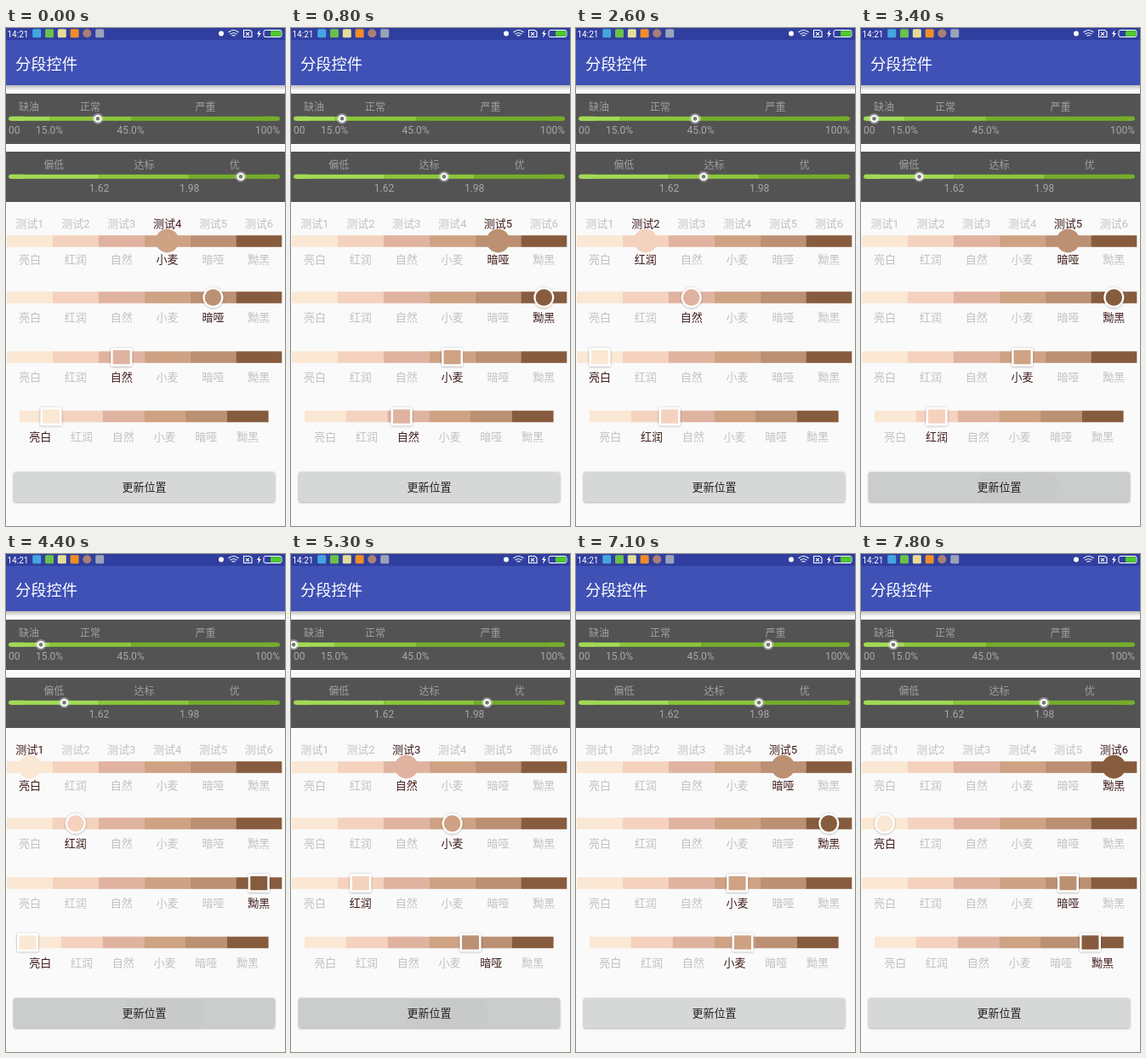
An HTML page that plays this animation: 328x584 px, repeating every 8 s.

```html
<!DOCTYPE html>
<html lang="zh-CN">
<head>
<meta charset="utf-8">
<title>分段控件</title>
<style>
html, body { margin: 0; width: 100%; height: 100%; overflow: hidden; background: #fafafa; }
svg { display: block; width: 328px; height: 584px; }
text { font-family: Roboto, "Noto Sans CJK SC", "Noto Sans CJK", sans-serif; }
</style>
</head>
<body>
<svg id="stage" viewBox="0 0 328 584">
  <defs>
    <linearGradient id="fade" x2="0" y2="1">
      <stop stop-color="#000" stop-opacity=".26"/>
      <stop offset="1" stop-color="#000" stop-opacity="0"/>
    </linearGradient>
    <filter id="soft" x="-30%" y="-30%" width="160%" height="160%">
      <feDropShadow dx="0" dy=".4" stdDeviation="1.2" flood-opacity=".42"/>
    </filter>
    <clipPath id="face"><rect x="9" y="521" width="307" height="35" rx="2"/></clipPath>
  </defs>
</svg>
<script>
const stage = document.getElementById('stage');
const LOOP = 8000, PRESS = 300;
const SKIN = ['#fae8d4', '#f4d2be', '#e0b3a0', '#cea283', '#bc9072', '#875c3e'];
const GREEN = ['#a2da55', '#8bc73a', '#75ad2b'];
const TONES = ['亮白', '红润', '自然', '小麦', '暗哑', '黝黑'];
const TESTS = TONES.map((_, i) => '测试' + (i + 1));

// Every press: time, upper slider x, lower slider x, free thumb x
const PRESSES = [
  [0, 108, 276, 53],
  [500, 60, 180, 130],
  [1100, 190, 120, 250],
  [1700, 79.5, 3, 211],
  [2300, 140, 150, 110],
  [2700, 255, 98, 170],
  [3000, 94, 245, 235],
  [3400, 15.5, 68.5, 89],
  [3900, 120, 160, 150],
  [4400, 41, 68.5, 25.5],
  [4900, 165, 130, 120],
  [5300, 3, 230.5, 211],
  [5700, 78, 170, 145],
  [6400, 226, 215, 196],
  [7500, 38, 215, 269.5]
];

function add(tag, attrs, parent = stage) {
  const node = document.createElementNS('http://www.w3.org/2000/svg', tag);
  for (const key in attrs) node.setAttribute(key, attrs[key]);
  return parent.appendChild(node);
}
const rect = (x, y, width, height, fill, more) =>
  add('rect', { x, y, width, height, fill, ...more });

function label(str, x, middle, size, fill, anchor = 'middle') {
  const node = add('text', { x, y: middle + size * .37, 'font-size': size, fill, 'text-anchor': anchor });
  node.textContent = str;
  return node;
}

function drawHeader() {
  rect(0, 67, 328, 6, 'url(#fade)');
  rect(0, 14, 328, 53, '#3f51b5');
  rect(0, 0, 328, 14, '#303f9f');
  label('14:21', 1.5, 6.8, 10, '#fff', 'start');
  ['#45a5e0', '#6cc04a', '#e3dc9a', '#ef8d28', '#a98078', '#9aa3ba'].forEach((fill, i) =>
    i === 4 ? add('circle', { cx: 95.3, cy: 6.3, r: 5, fill })
            : rect(31.2 + i * 14.8, 1.3, 10, 10, fill, { rx: 1.5 }));
  add('circle', { cx: 253, cy: 6.5, r: 3, fill: '#fff' });
  const line = { fill: 'none', stroke: '#fff', 'stroke-width': 1.1 };
  add('path', { d: 'M261.5 5q6-5 12 0M263.5 7.2q4-3 8 0M265.5 9.2q2-1.4 4 0', ...line });
  add('path', { d: 'M279.5 2.5h7l2.5 2v6h-9.5zM282 4.8l4 4m0-4l-4 4', ...line });
  add('path', { d: 'M298.5 2l-3.5 5h2l-1 4.5 4-5.5h-2.3z', fill: '#fff' });
  rect(303, 2.5, 21, 8, 'none', { rx: 2, stroke: '#fff', 'stroke-width': 1 });
  rect(311, 3.2, 12.5, 6.6, '#4fc92f', { rx: 1 });
  label('分段控件', 11, 41.8, 18.3, '#fff', 'start');
}

function drawSlider(top, stops, names, marks) {
  const y = top + 29.3;
  rect(0, top, 328, 59, '#535353');
  rect(3, y - 2.5, 20, 5, GREEN[0], { rx: 2.5 });
  rect(302, y - 2.5, 20, 5, GREEN[2], { rx: 2.5 });
  GREEN.forEach((fill, i) => {
    const from = i ? stops[i] : 6, to = i < 2 ? stops[i + 1] : 319;
    rect(from, y - 2.5, to - from, 5, fill);
    label(names[i], (stops[i] + stops[i + 1]) / 2, top + 15.5, 12, '#a0a0a0');
  });
  marks.forEach(([str, x, anchor]) => label(str, x, top + 43, 12, '#a8a8a8', anchor));
  const thumb = add('g', {});
  add('circle', { cy: y, r: 6.3, fill: '#ddd', 'fill-opacity': .45 }, thumb);
  add('circle', { cy: y, r: 3.4, fill: '#777', stroke: '#fff', 'stroke-width': 2 }, thumb);
  return x => thumb.setAttribute('transform', `translate(${x})`);
}

function drawRow(y, left, step, below, shape, above) {
  const centre = i => left + step * (i + .5);
  SKIN.forEach((fill, i) => rect(left + i * step, y - 6.8, step + .1, 13.6, fill));
  const write = (list, middle) => list.map((str, i) => label(str, centre(i), middle, 13, '#c0c0c0'));
  const lines = [write(TONES, below)];
  if (above) lines.push(write(TESTS, above));
  const thumb = add('g', {});
  let fillNode;
  if (shape === 'plain') {
    fillNode = add('circle', { cy: y - .4, r: 13.8 }, thumb);
  } else if (shape === 'ring') {
    add('circle', { cy: y, r: 12, fill: '#fff', filter: 'url(#soft)' }, thumb);
    fillNode = add('circle', { cy: y, r: 9.8 }, thumb);
  } else {
    add('rect', { x: -12.5, y: y - 10.8, width: 25, height: 21.6, rx: 1, fill: '#fff', filter: 'url(#soft)' }, thumb);
    fillNode = add('rect', { x: -10, y: y - 8.2, width: 20, height: 16.4 }, thumb);
  }
  return (pick, x = centre(pick)) => {
    thumb.setAttribute('transform', `translate(${x})`);
    fillNode.setAttribute('fill', SKIN[pick]);
    for (const line of lines)
      line.forEach((node, i) => node.setAttribute('fill', i === pick ? '#3e1a1a' : '#c0c0c0'));
  };
}

function drawButton() {
  rect(9, 521, 307, 35, '#d6d7d7', { rx: 2, filter: 'url(#soft)' });
  const press = add('g', { 'clip-path': 'url(#face)' });
  add('rect', { x: 9, y: 521, width: 307, height: 35, 'fill-opacity': .05 }, press);
  const ripple = add('circle', { cx: 185, cy: 539, 'fill-opacity': .015 }, press);
  label('更新位置', 162.5, 538.5, 13, '#212121');
  return age => {
    press.setAttribute('opacity', age < PRESS ? 1 : 0);
    ripple.setAttribute('r', 46 + 110 * Math.min(age / PRESS, 1));
  };
}

drawHeader();
const upper = drawSlider(77, [3, 51, 147, 322], ['缺油', '正常', '严重'],
  [['00', 3, 'start'], ['15.0%', 51], ['45.0%', 146.5], ['100%', 322, 'end']]);
const lower = drawSlider(145, [3, 109.3, 215.6, 322], ['偏低', '达标', '优'],
  [['1.62', 109.5], ['1.98', 215.6]]);
const FREE_LEFT = 16, FREE_STEP = 48.75;
const plain = drawRow(250, 1, 53.87, 271, 'plain', 229.3);
const ring = drawRow(316, 1, 53.87, 339, 'ring');
const square = drawRow(386, 1, 53.87, 409, 'square');
const free = drawRow(455.5, FREE_LEFT, FREE_STEP, 479, 'square');
const button = drawButton();

function render(now) {
  const t = now % LOOP;
  const count = PRESSES.findLastIndex(p => p[0] <= t);
  const [start, a, b, x] = PRESSES[count];
  const pick = (count + 3) % 6;
  upper(a);
  lower(b);
  plain(pick);
  ring((pick + 1) % 6);
  square((pick + 5) % 6);
  free(Math.floor((x - FREE_LEFT) / FREE_STEP), x);
  button(count ? t - start : PRESS);
}

const origin = performance.now();
function tick() {
  render(performance.now() - origin);
  requestAnimationFrame(tick);
}
tick();
</script>
</body>
</html>
```
